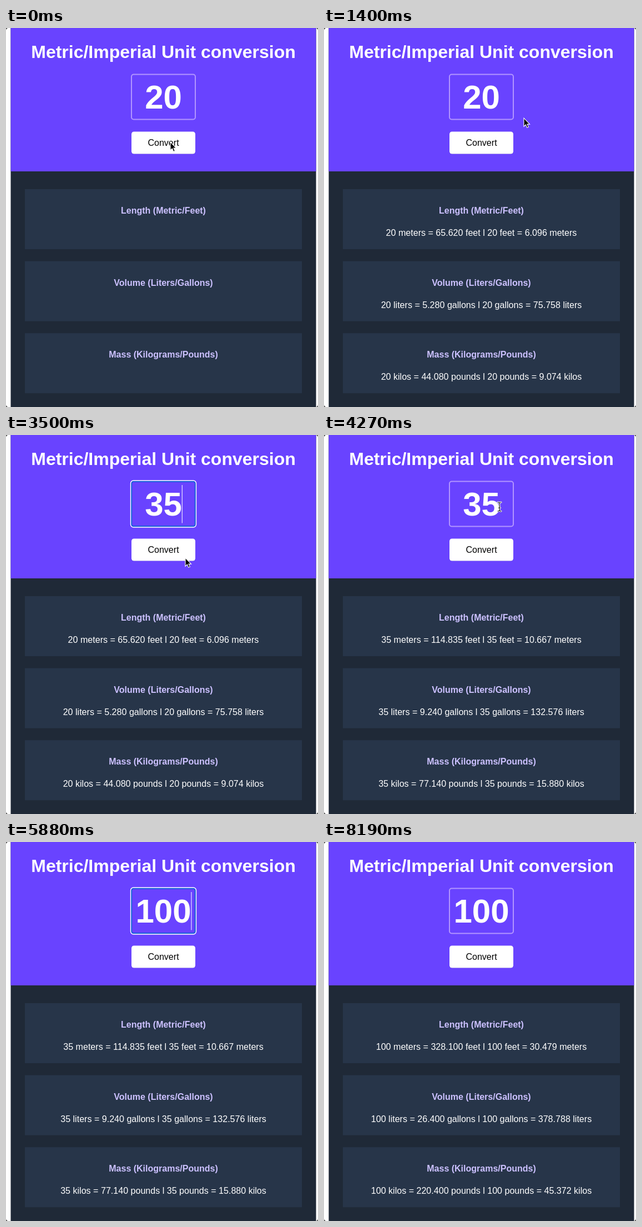
Animation, 562 px wide and 682 px high, one loop 8.68 s. Source, as an HTML page:

```html
<!DOCTYPE html>
<html lang="en">
<head>
<meta charset="utf-8">
<title>Unit conversion</title>
<style>
  html, body { margin: 0; width: 100%; height: 100%; overflow: hidden; background: #fff; }
  svg { display: block; }
  text { font-family: "Liberation Sans", Arial, Helvetica, sans-serif; font-size: 16.07px; text-anchor: middle; fill: #fff; }
  .title { font-size: 32px; font-weight: 700; }
  .num { font-size: 60px; font-weight: 700; }
  .name { font-size: 16px; font-weight: 700; fill: #ccc1ff; }
  .convert { fill: #000; }
</style>
</head>
<body>
<svg width="562" height="682" viewBox="0 0 562 682">
  <rect x="8.5" width="550" height="682" fill="#1f2937"/>
  <rect x="8.5" width="550" height="258" fill="#6943ff"/>
  <path d="M0 0h3l-3 3zM562 0h-3l3 3zM0 682h3l-3-3zM562 682h-3l3-3z" fill="#555"/>
  <text class="title" x="283.5" y="53.5">Metric/Imperial Unit conversion</text>
  <rect id="border" x="226" y="83.5" width="115" height="81" rx="4" fill="none" stroke="#b295ff" stroke-width="2"/>
  <g id="focus" fill="none">
    <rect x="226.2" y="83.7" width="114.6" height="80.6" rx="4" stroke="#1263d6" stroke-width="2"/>
    <rect x="224.5" y="82" width="118" height="84" rx="5" stroke="#fff" stroke-width="1.4"/>
  </g>
  <text id="num" class="num" x="283.5" y="145"></text>
  <rect id="caret" y="90" width="1" height="68.5" fill="#fff"/>
  <rect x="226" y="187" width="115" height="40" rx="4.5" fill="#4a2fb8" opacity=".5"/>
  <rect x="226" y="186.5" width="115" height="40" rx="4.5" fill="#fff"/>
  <text class="convert" x="283.5" y="212">Convert</text>
  <g id="cards"></g>
  <circle id="ring" r="22" fill="none" stroke="#000" stroke-opacity=".7" stroke-width="1.6"/>
  <path id="arrow" d="M0 0V15.2L3.4 12L5.8 17.4L8.3 16.3L6 11.1H10.6Z" fill="#000" stroke="#fff" stroke-width="1.1"/>
  <g id="beam" fill="none" stroke-linecap="round">
    <g stroke="#fff" stroke-width="3"><path id="stem" d="M-3-8Q0-8 0-6Q0-8 3-8M0-6V6M-3 8Q0 8 0 6Q0 8 3 8M-1.5 2H1.5"/></g>
    <use href="#stem" stroke="#222" stroke-width="1.2"/>
  </g>
</svg>
<script>
const LOOP = 8680, STEP = 70;
const $ = id => document.getElementById(id);

const units = [
  { name: "Length (Metric/Feet)", metric: "meters", imperial: "feet", factor: 3.281 },
  { name: "Volume (Liters/Gallons)", metric: "liters", imperial: "gallons", factor: 0.264 },
  { name: "Mass (Kilograms/Pounds)", metric: "kilos", imperial: "pounds", factor: 2.204 }
];
$("cards").innerHTML = units.map(({ name }, i) => {
  const y = 290 + i * 129.6;
  return `<rect x="34" y="${y}" width="499" height="108" fill="#273549"/>
    <text class="name" x="283.5" y="${y + 44}">${name}</text>
    <text class="value" x="283.5" y="${y + 84}"></text>`;
}).join("");
const values = document.querySelectorAll(".value");

// Each round: click the field, edit from one time to another, press the button, see the result.
const rounds = [
  { n: "20", press: 280, done: 420 },
  { n: "35", click: 2170, from: 2520, to: 3220, press: 3570, done: 3640 },
  { n: "100", click: 4900, from: 5390, to: 5880, press: 6650, done: 6790 }
];

// Pointer legs: start, end, and the point reached.
const legs = [
  [70, 140, 294, 206.5],
  [630, 1050, 271, 383],
  [1190, 1400, 360, 162],
  [1400, 2100, 327, 130],
  [3220, 3500, 323, 221],
  [3920, 4270, 316, 129],
  [6160, 6580, 288, 202],
  [7280, 7630, 357, 550],
  [7700, 8190, 304, 690]
];

function pointer(t) {
  let x = 296, y = 205;
  for (const [start, end, x1, y1] of legs) {
    const k = Math.min(1, Math.max(0, (t - start) / (end - start)));
    const e = (1 - Math.cos(Math.PI * k)) / 2;
    x += (x1 - x) * e;
    y += (y1 - y) * e;
  }
  return [x, y];
}

// Erase the old number, then type the new one, at an even pace.
function fieldText(t) {
  return rounds.reduce((old, { n, from, to }) => {
    if (!old) return n;
    if (t < from) return old;
    const last = old.length + n.length - 1;
    const edits = 1 + Math.floor((t - from) * last / (to - from));
    return edits <= old.length ? old.slice(0, -edits) : n.slice(0, edits - old.length);
  }, "");
}

const show = (id, on) => $(id).style.display = on ? "" : "none";

function draw(ms) {
  const t = Math.floor(ms % LOOP / STEP) * STEP;
  const text = fieldText(t);
  const n = rounds.reduce((v, r) => t >= r.done ? r.n : v, "");
  const focus = rounds.some(r => t >= r.click && t < r.press);
  const ring = rounds.some(r => t >= r.press && t < r.done || t >= r.click && t < r.click + STEP);
  const typing = rounds.some(r => t >= r.from && t < r.to + STEP);
  const [x, y] = pointer(t);

  $("num").textContent = text;
  $("caret").setAttribute("x", 283.4 + text.length * 16.68);
  show("caret", focus);
  show("focus", focus);
  show("border", !focus);

  units.forEach(({ metric, imperial, factor }, i) => {
    values[i].textContent = n
      ? `${n} ${metric} = ${(n * factor).toFixed(3)} ${imperial} l ${n} ${imperial} = ${(n / factor).toFixed(3)} ${metric}`
      : "";
  });

  const inField = x > 225 && x < 342 && y > 82 && y < 166;
  show("arrow", !typing && !inField);
  show("beam", !typing && inField);
  show("ring", ring);
  for (const id of ["arrow", "beam", "ring"]) $(id).setAttribute("transform", `translate(${x} ${y})`);
}

const start = performance.now();
function tick() {
  draw(performance.now() - start);
  requestAnimationFrame(tick);
}
tick();
</script>
</body>
</html>
```
